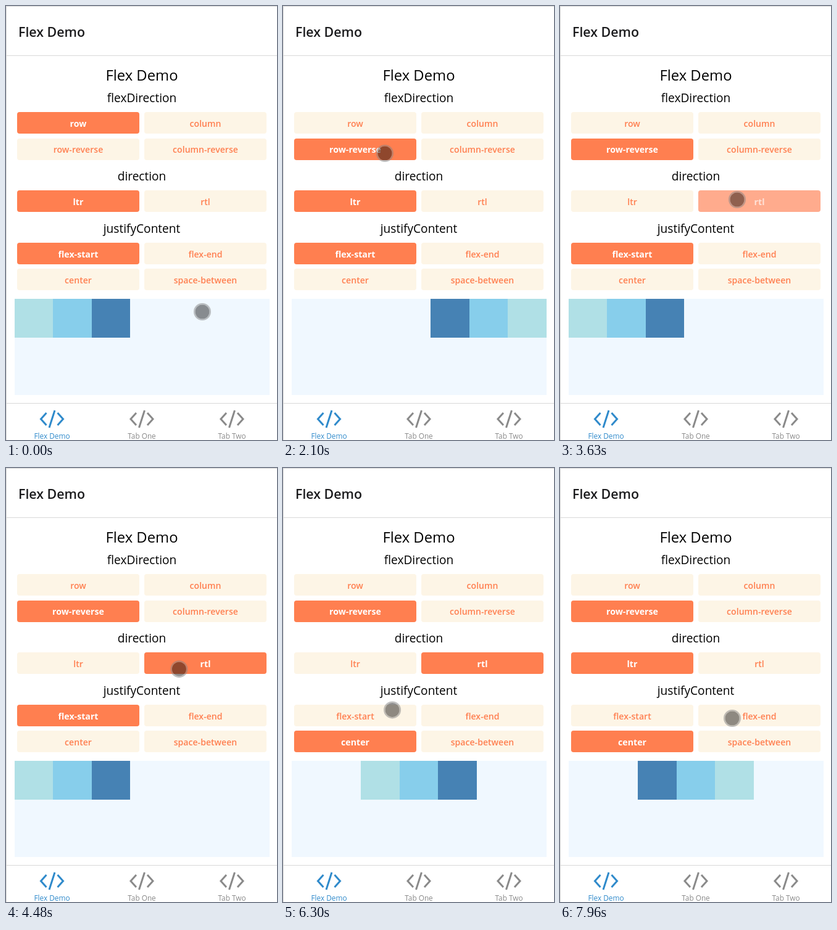
Recreate the animation shown at these times as an HTML page with a canvas. Size 439 by 704 pixels, loop 8000 ms.

```html
<!DOCTYPE html>
<html lang="en">
<head>
<meta charset="utf-8">
<title>Flex Demo</title>
<style>
  html, body { margin: 0; width: 100%; height: 100%; overflow: hidden; background: #fff; }
  canvas { display: block; width: 439px; height: 704px; }
</style>
</head>
<body>
<canvas id="stage" width="439" height="704"></canvas>
<script>
const ctx = document.getElementById('stage').getContext('2d');
const LOOP = 8000;
const FONT = '"Open Sans", "Noto Sans", sans-serif';
const CORAL = '#ff7f50', CREAM = '#fdf5e6', LINE = '#d8d8d8';
const BLUE = '#2f8acb', GRAY = '#8a8a8a';
const TILE = 62.5, PANEL = { x: 14, y: 475, w: 413, h: 156 };
const TILE_COLORS = ['#b0e0e6', '#87ceeb', '#4682b4'];

const BUTTONS = [
  ['row', 18, 172, 'dir'], ['column', 224, 172, 'dir'],
  ['row-reverse', 18, 215, 'dir'], ['column-reverse', 224, 215, 'dir'],
  ['ltr', 18, 299, 'flow'], ['rtl', 224, 299, 'flow'],
  ['flex-start', 18, 384, 'justify'], ['flex-end', 224, 384, 'justify'],
  ['center', 18, 426, 'justify'], ['space-between', 224, 426, 'justify'],
].map(([label, x, y, group]) => ({ label, x, y, group }));

const TAPS = [
  { label: 'row-reverse', group: 'dir', down: 1690, up: 1830, end: 2100 },
  { label: 'rtl', group: 'flow', down: 3320, up: 3540, end: 3830 },
  { label: 'center', group: 'justify', down: 5450, up: 5590, end: 5840 },
  { label: 'ltr', group: 'flow', down: 6910, up: 6970, end: 7190 },
];

const clamp = v => Math.min(1, Math.max(0, v));
const easeIn = p => t => t ** p;
const easeOut = p => t => 1 - (1 - t) ** p;
const sine = t => (1 - Math.cos(Math.PI * t)) / 2;
const fade = easeOut(2.2);

// Pointer moves: start, end, control point, destination, easing
const HOME = [318, 496];
const MOVES = [
  [430, 1240, [318, 350], [177, 247], sine],
  [1260, 1440, [171, 243], [165, 239], easeOut(1.6)],
  [2430, 3220, [222, 282], [287, 314], sine],
  [4270, 5130, [258, 372], [188, 420], easeIn(1.6)],
  [5130, 5420, [176, 430], [171, 443], easeOut(2)],
  [6130, 6910, [185, 381.5], [167, 321], easeOut(2.15)],
  [7530, 7960, [218, 368], [279, 406], easeIn(1.7)],
];

function pointerAt(t) {
  let pos = HOME;
  for (const [start, end, mid, to, ease] of MOVES) {
    if (t < start) break;
    const k = ease(clamp((t - start) / (end - start))), from = pos;
    pos = [0, 1].map(i =>
      (1 - k) ** 2 * from[i] + 2 * k * (1 - k) * mid[i] + k * k * to[i]);
  }
  return pos;
}

function stateAt(t) {
  const state = { dir: 'row', flow: 'ltr', justify: 'flex-start' };
  for (const tap of TAPS) if (t >= tap.up) state[tap.group] = tap.label;
  return state;
}

function opacityAt(label, t) {
  const tap = TAPS.find(p => p.label === label);
  if (!tap || t < tap.down || t > tap.end) return 1;
  const pressed = 1 - 0.8 * fade(clamp((Math.min(t, tap.up) - tap.down) / 150));
  return pressed + (1 - pressed) * fade(clamp((t - tap.up) / (tap.end - tap.up)));
}

function text(str, x, y, size, weight, color, align = 'center') {
  ctx.font = `${weight} ${size}px ${FONT}`;
  ctx.textAlign = align;
  ctx.fillStyle = color;
  ctx.fillText(str, x, y);
}

function rect(x, y, w, h, color) {
  ctx.fillStyle = color;
  ctx.fillRect(x, y, w, h);
}

function drawButton({ label, x, y, group }, state, t) {
  const on = state[group] === label;
  ctx.globalAlpha = opacityAt(label, t);
  ctx.fillStyle = on ? CORAL : CREAM;
  ctx.beginPath();
  ctx.roundRect(x, y, 198, 35, 4);
  ctx.fill();
  const base = y + (y === 215 ? 22.5 : 23.5);
  if (on) text(label, x + 99, base, 14.2, 700, '#fff');
  else text(label, x + 99, base, 14.1, 600, CORAL);
  ctx.globalAlpha = 1;
}

function drawTiles({ dir, flow, justify }) {
  rect(PANEL.x, PANEL.y, PANEL.w, PANEL.h, '#f0f8ff');
  const reversed = (dir === 'row-reverse') !== (flow === 'rtl');
  const free = PANEL.w - 3 * TILE;
  const left = PANEL.x + (justify === 'center' ? free / 2 : reversed ? free : 0);
  for (let i = 0; i < 3; i++) {
    const a = Math.floor(left + i * TILE), b = Math.floor(left + (i + 1) * TILE);
    rect(a, PANEL.y, b - a, 63, TILE_COLORS[reversed ? 2 - i : i]);
  }
}

function drawTab(label, x, color) {
  ctx.strokeStyle = color;
  ctx.lineWidth = 3;
  ctx.beginPath();
  for (const s of [-1, 1]) {
    ctx.moveTo(x + s * 9, 660);
    ctx.lineTo(x + s * 18, 670);
    ctx.lineTo(x + s * 9, 680);
  }
  ctx.moveTo(x + 4.5, 656);
  ctx.lineTo(x - 4.5, 684);
  ctx.stroke();
  text(label, x, 702, 11.8, 400, color);
}

function drawPointer([x, y]) {
  ctx.beginPath();
  ctx.arc(x, y, 11.5, 0, 2 * Math.PI);
  ctx.fillStyle = 'rgba(0,0,0,.44)';
  ctx.fill();
  ctx.beginPath();
  ctx.arc(x, y, 12.75, 0, 2 * Math.PI);
  ctx.lineWidth = 2.5;
  ctx.strokeStyle = 'rgba(130,130,130,.5)';
  ctx.stroke();
}

function draw(t) {
  const state = stateAt(t);
  rect(0, 0, 439, 704, '#fff');
  rect(0, 80, 439, 1, LINE);
  rect(0, 644, 439, 1, LINE);
  rect(0, 0, 439, 1, LINE);
  rect(0, 0, 1, 704, LINE);
  text('Flex Demo', 20, 50, 21.4, 600, '#1c1c1e', 'left');
  text('Flex Demo', 220, 121, 23.8, 400, '#000');
  text('flexDirection', 220, 156, 19.1, 400, '#000');
  text('direction', 220, 283, 19.1, 400, '#000');
  text('justifyContent', 220, 368, 19.1, 400, '#000');
  BUTTONS.forEach(b => drawButton(b, state, t));
  drawTiles(state);
  drawTab('Flex Demo', 74.5, BLUE);
  drawTab('Tab One', 220, GRAY);
  drawTab('Tab Two', 366, GRAY);
  drawPointer(pointerAt(t));
}

const began = performance.now();
function tick() {
  draw((performance.now() - began) % LOOP);
  requestAnimationFrame(tick);
}
tick();
</script>
</body>
</html>
```
